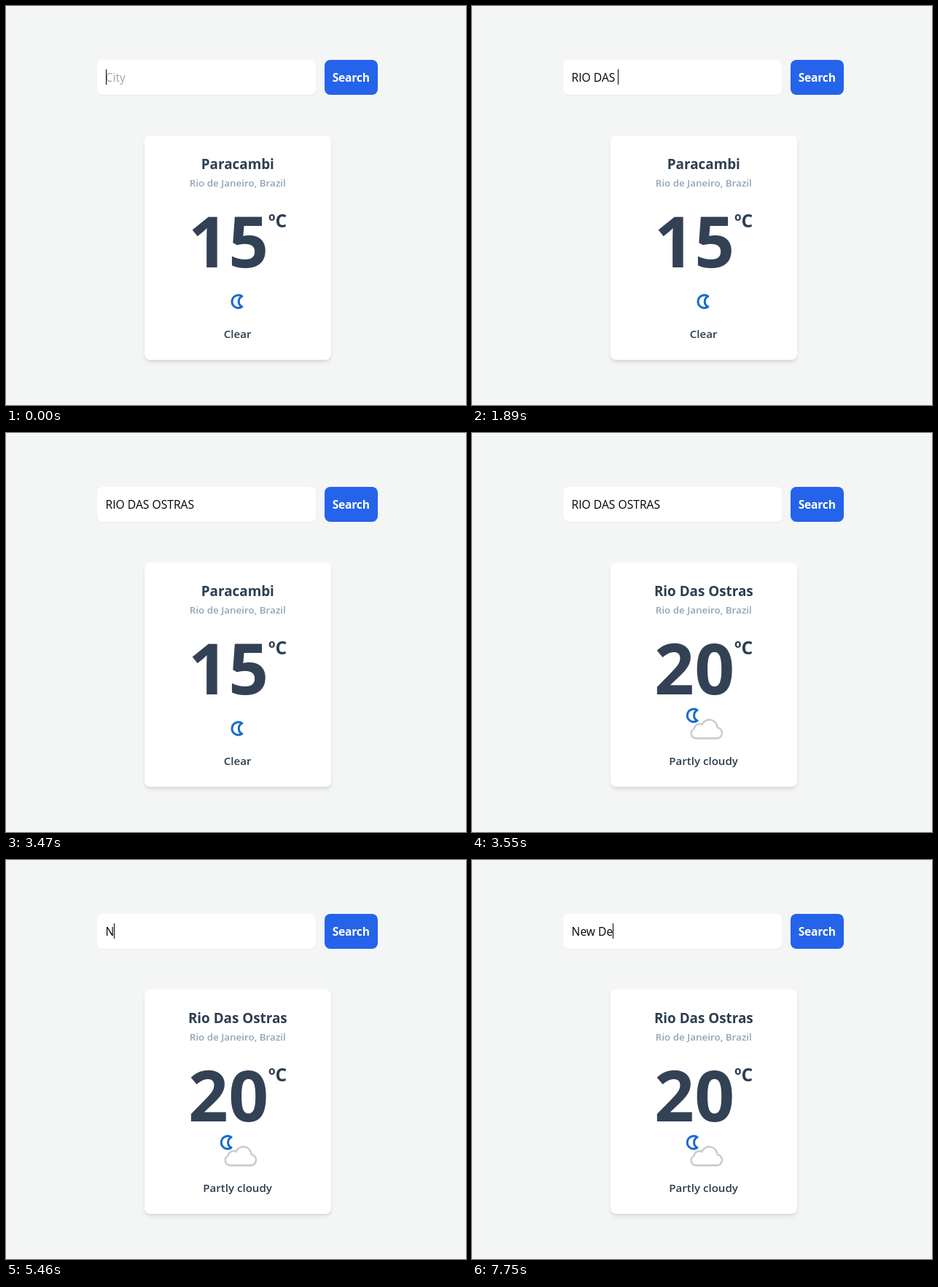
These frames come from a looping animation (631x548 px, 8000 ms). An HTML page:

```html
<!DOCTYPE html>
<html lang="en">
<head>
<meta charset="utf-8">
<title>Weather search</title>
<style>
  html, body { margin: 0; width: 100%; height: 100%; overflow: hidden; background: #f4f6f6; }
  div, svg { position: absolute; }
  div { border-radius: 8px; background: #fff; }
  .field { left: 125px; top: 74px; width: 300px; height: 48px; box-shadow: 0 1px 2px #0000000d; }
  .button { left: 437px; top: 74px; width: 73px; height: 48px; background: #2563eb; }
  .card { left: 190px; top: 178px; width: 256px; height: 308px;
          box-shadow: 0 4px 6px -1px #0000001a, 0 2px 4px -1px #0000000f; }
  svg { left: 0; top: 0; }
  text { font-family: "Open Sans", "Noto Sans", sans-serif; fill: #2c3e50; white-space: pre; }
  .mid { text-anchor: middle; }
  .bold { font-weight: 700; }
  .semi { font-weight: 600; }
  path { fill: none; stroke-linejoin: round; }
</style>
</head>
<body>
<div class="field"></div>
<div class="button"></div>
<div class="card"></div>
<svg width="631" height="548">
  <rect id="selection" x="137" y="86" height="24" fill="#3367d1"/>
  <text id="typed" x="136.6" y="104" font-size="15.65"></text>
  <rect id="caret" y="87" width="1" height="21" fill="#000"/>
  <text class="mid bold" x="473.2" y="104" font-size="15.6" letter-spacing="-.2" style="fill:#fff">Search</text>

  <text id="city" class="mid bold" x="317.8" y="224" font-size="18.85"></text>
  <text class="mid semi" x="317.8" y="248" font-size="13.4" style="fill:#94a3b8">Rio de Janeiro, Brazil</text>
  <text id="degrees" class="bold" x="250" y="358.7" font-size="96" letter-spacing=".4" style="fill:#334155"></text>
  <text class="bold" x="360" y="304" font-size="24.6">ºC</text>
  <path id="moon" stroke="#1a6bcb" stroke-width="3" d="M323.8 398.7A8.8 8.8 0 1 0 323.8 413.1A8 8 0 0 1 323.8 398.7Z"/>
  <path id="cloud" stroke="#ccc" stroke-width="2.6" d="M307.5 419.4A6.9 6.9 0 0 1 304.6 406.3A7.5 7.5 0 0 1 315.5 400.5A10.95 10.95 0 0 1 336.5 404.5A7.5 7.5 0 0 1 336.3 419.4Z"/>
  <text id="sky" class="mid semi" x="317.6" y="456" font-size="15.1"></text>
</svg>
<script>
const LOOP = 8000, RESULT_AT = 3550;
const $ = id => document.getElementById(id);

// [time, field text, cursor mode]
const steps = [[0, "", "on"], [160, "", "off"]];
const type = (text, times) =>
  times.forEach((time, i) => steps.push([time, text.slice(0, i + 1), "on"]));

const query = "RIO DAS OSTRAS";
type(query, [700, 830, 960, 1170, 1300, 1480, 1800, 1890, 2130, 2220, 2430, 2590, 2800, 2930]);
steps.push([3470, query, "off"], [4010, query, "on"], [4550, query, "off"],
           [4670, query, "selected"], [4920, "", "on"], [6400, "Ne", "off"]);
type("New De", [5460, 5910, 6570, 6770, 7320, 7750]);
steps.sort((a, b) => a[0] - b[0]);

const show = (id, visible) => $(id).setAttribute("visibility", visible ? "visible" : "hidden");

function draw(t) {
  const [, text, mode] = steps.findLast(step => step[0] <= t);
  const typed = $("typed");
  typed.textContent = text || "City";
  typed.style.fill = mode === "selected" ? "#fff" : text ? "#000" : "#9ca3af";
  const width = text ? typed.getComputedTextLength() : 0;
  $("caret").setAttribute("x", Math.floor(137 + width));
  $("selection").setAttribute("width", Math.round(width));
  show("caret", mode === "on");
  show("selection", mode === "selected");

  const found = t >= RESULT_AT;
  $("city").textContent = found ? "Rio Das Ostras" : "Paracambi";
  $("degrees").textContent = found ? "20" : "15";
  $("sky").textContent = found ? "Partly cloudy" : "Clear";
  $("moon").setAttribute("transform", found ? "translate(-14.7 -18)" : "");
  show("cloud", found);
}

const start = performance.now();
function frame() {
  draw((performance.now() - start) % LOOP);
  requestAnimationFrame(frame);
}
frame();
</script>
</body>
</html>
```
